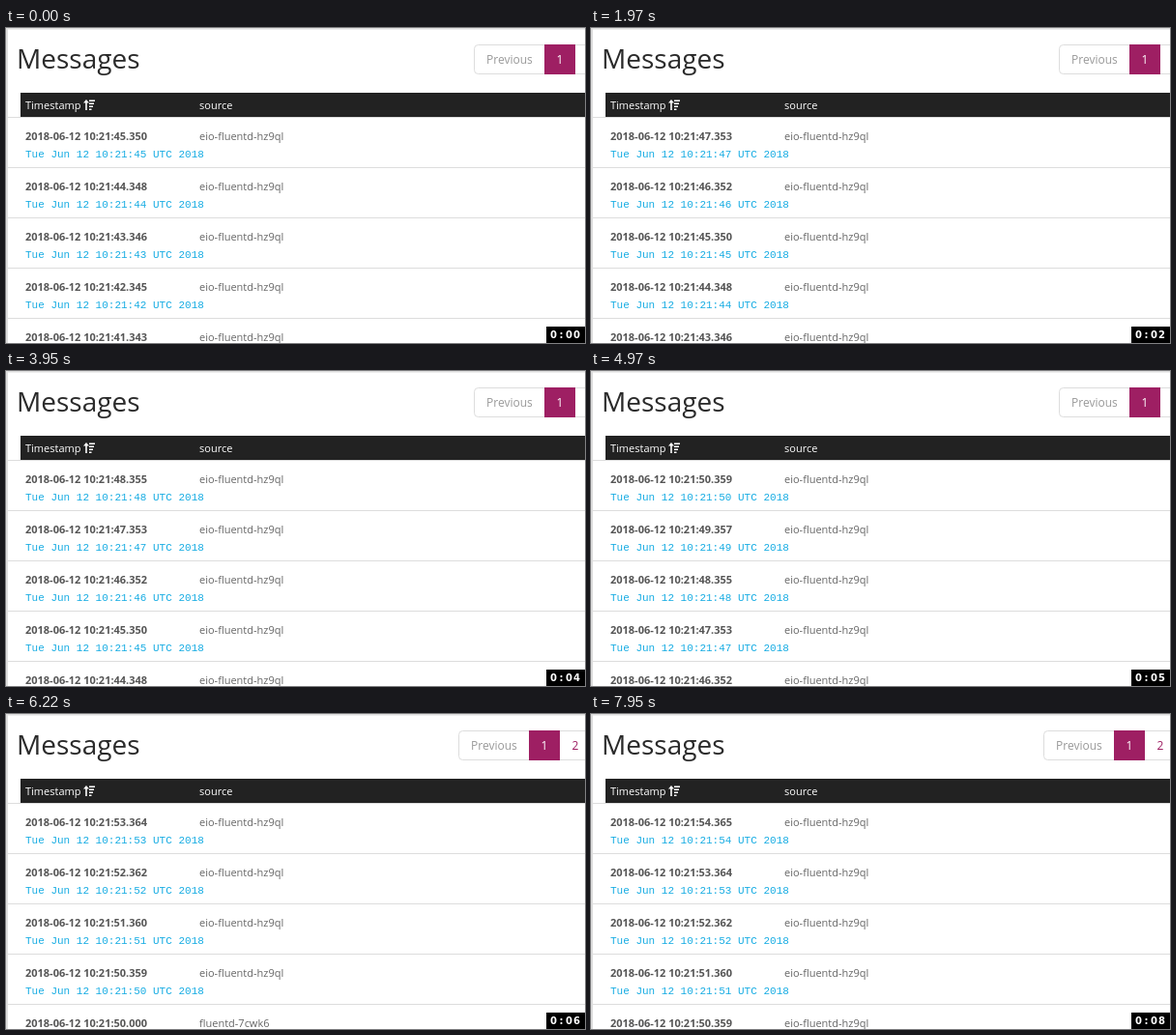
Animation of 599 by 326 pixels, one loop 8050 ms. Source, as an HTML page:

```html
<!DOCTYPE html>
<html lang="en">
<head>
<meta charset="utf-8">
<title>Messages</title>
<style>
  html, body { margin: 0; width: 100%; height: 100%; overflow: hidden; background: #fff; }
  svg { display: block; width: 599px; height: 326px; font: 11px "Open Sans", sans-serif; }
  .title { font-size: 28px; fill: #2b2b2b; }
  .pager { font-size: 12px; }
  .time { font-weight: bold; fill: #555; }
  .source { fill: #666; }
  .log { font-family: "Liberation Mono", monospace; fill: #16ace3; white-space: pre; }
  .clock { font: bold 10px "DejaVu Sans", sans-serif; fill: #fff; text-anchor: middle; }
</style>
</head>
<body>
<svg viewBox="0 0 599 326">
  <path d="M0 0H599V1.5H2V326H0Z" fill="#dedede"/>
  <text class="title" x="11" y="42">Messages</text>

  <g id="pager" class="pager">
    <rect x="484.5" y="17.5" width="150" height="30" rx="4" fill="#fff" stroke="#ddd"/>
    <text x="497" y="37" fill="#999">Previous</text>
    <rect x="557" y="17" width="32" height="31" fill="#9e1f63"/>
    <text x="573" y="37" fill="#fff" text-anchor="middle">1</text>
    <text x="605" y="37" fill="#9e1f63" text-anchor="middle">2</text>
  </g>

  <path d="M2 92.5H599M2 144.5H599M2 196.5H599M2 248.5H599M2 300.5H599" stroke="#ddd"/>
  <rect x="15" y="67" width="584" height="25" fill="#222"/>
  <g fill="#fff">
    <text x="20" y="84">Timestamp</text>
    <text x="200" y="84">source</text>
    <path d="M83 74L86 77.5H83.8V85H82.2V77.5H80ZM86 74.5H92V76H86ZM86 77.5H91V79H86ZM86 80.5H90V82H86ZM86 83.5H88.5V85H86Z"/>
  </g>

  <g id="rows"></g>

  <rect x="559" y="309" width="40" height="17"/>
  <g class="clock">
    <text x="566.5" y="321">0</text>
    <text x="574.5" y="321">:</text>
    <text x="582.5" y="321">0</text>
    <text id="seconds" x="590.5" y="321">0</text>
  </g>
</svg>
<script>
const LOOP = 8050;
const $ = id => document.getElementById(id);

// One heartbeat per second, drifting slightly later each time.
const beat = s => ({
  time: `${s}.${Math.round(349.87 + 1.73 * (s - 45))}`,
  source: 'eio-fluentd-hz9ql',
  log: `Tue Jun 12 10:21:${s} UTC 2018`
});
const beats = newest => [0, 1, 2, 3, 4].map(i => beat(newest - i));

const warning = {
  time: '50.000', source: 'fluentd-7cwk6',
  log: 'Tue Jun 12 10:21:50 2018 WARNING: You have disabled Replay Protection (--no-replay) which may be unsafe'
};
const trace = {
  time: '50.000', source: 'fluentd-7jz5d',
  log: 'at java.net.AbstractPlainSocketImpl.connectToAddress(AbstractPlainSocketImpl.java:206)'
};

const updates = [
  [0, beats(45)],
  [240, beats(46)],
  [1190, beats(47)],
  [2270, beats(48)],
  [4250, beats(50)],
  [5260, [beat(52), beat(50), warning, trace, trace]],
  [6220, [...beats(53).slice(0, 4), warning]],
  [7170, beats(54)]
];
const ticks = [960, 1970, 2990, 3950, 4970, 5980, 6930, 7950];

const rowMarkup = (row, i) => {
  const y = 116 + 52 * i;
  return `<text class="time" x="20" y="${y}">2018-06-12 10:21:${row.time}</text>
    <text class="source" x="200" y="${y}">${row.source}</text>
    <text class="log" x="20" y="${y + 18}">${row.log}</text>`;
};

let shown;
function draw(now) {
  const t = now % LOOP;
  const [start, rows] = updates.findLast(([at]) => at <= t);
  if (start !== shown) {
    shown = start;
    $('rows').innerHTML = rows.map(rowMarkup).join('');
    $('pager').setAttribute('transform', `translate(${start >= 6220 ? -16 : 0})`);
  }
  $('seconds').textContent = ticks.filter(at => at <= t).length;
}

const begin = performance.now();
function loop() {
  draw(performance.now() - begin);
  requestAnimationFrame(loop);
}
loop();
</script>
</body>
</html>
```
